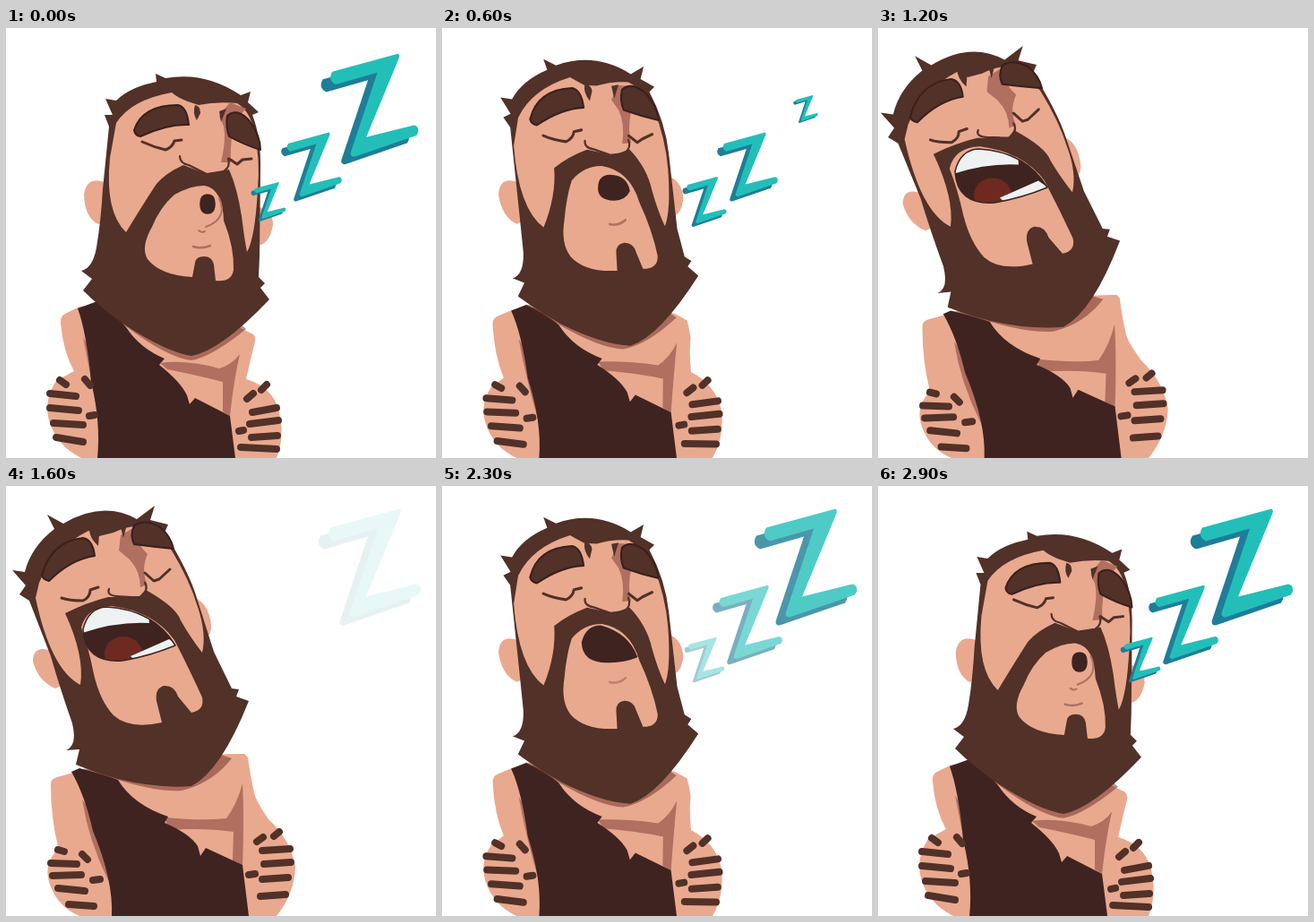
Recreate the animation shown at these times as an HTML page. Size 480 by 480 pixels, loop 3000 ms.

```html
<!DOCTYPE html>
<html lang="en">
<head>
<meta charset="utf-8">
<title>Snoring</title>
<style>
html, body { margin: 0; width: 100%; height: 100%; overflow: hidden; background: #fff; }
svg { display: block; width: 100%; height: 100%; }
</style>
</head>
<body>
<svg id="stage" viewBox="0 0 480 480" stroke-linejoin="round" stroke-linecap="round"></svg>
<script>
const stage = document.getElementById('stage');
const skin = '#e9a98f', shade = '#b06f5f', hair = '#513128', dark = '#3f2320';
const LOOP = 3000, STEP = 100;

function add(tag, attrs = {}, parent = stage) {
  const el = document.createElementNS('http://www.w3.org/2000/svg', tag);
  for (const k in attrs) el.setAttribute(k, attrs[k]);
  return parent.appendChild(el);
}

// Blend two paths that share the same commands.
function blend(a, b, k) {
  const to = b.match(/-?[\d.]+/g);
  let i = 0;
  return a.replace(/-?[\d.]+/g, v => (+v + (to[i++] - v) * k).toFixed(2));
}

// Find the pair of keys around t and pass them to mix.
function keyed(keys, t, mix = (a, b, k) => a + (b - a) * k) {
  let i = 1;
  while (i < keys.length - 1 && keys[i][0] < t) i++;
  const [t0, a] = keys[i - 1], [t1, b] = keys[i];
  return mix(a, b, Math.max(0, Math.min(1, (t - t0) / (t1 - t0))));
}

// Each shape has an upright and a leaning form.
const body = add('g'), head = add('g');
const shapes = [];
let layer = body;
function shape(fill, upright, leaning, attrs = {}) {
  const el = add('path', { fill, ...attrs }, layer);
  shapes.push({ el, upright, leaning });
  return el;
}
const line = (color, width, upright, leaning) =>
  shape('none', upright, leaning, { stroke: color, 'stroke-width': width });

// Body
shape(skin,
  'M82 311 L66 319 Q60 322 61 330 Q64 362 76 383 L56 394 Q42 415 48 438 Q56 466 84 480 L302 480 Q312 455 304 425 Q296 400 268 392 Q274 366 278 350 Q279 345 276 342 L258 333 L200 300Z',
  'M75 320 L57 325 Q49 327 50 335 Q50 370 58 402 L54 410 Q42 425 49 445 Q58 470 82 480 L302 480 Q322 455 323 425 Q318 395 293 372 Q278 350 277 342 Q273 325 270 303 L266 299 L195 300Z');
shape(shade,
  'M172 374 Q200 370 238 380 Q252 376 261 364 Q254 395 250 433 L242 428 L242 395 Q215 388 180 381Z',
  'M178 370 Q220 374 246 371 Q258 355 264 332 Q266 370 264 424 L253 418 L254 386 Q220 381 180 384Z');
shape(shade, 'M86 345 Q95 390 104 440 L110 440 L100 370Z', 'M85 350 Q92 395 114 440 L118 440 L100 370Z');
shape(dark,
  'M80 313 L102 305 Q120 316 134 334 Q150 358 177 369 L171 376 Q195 395 202 410 L205 420 L211 413 L250 433 L256 480 L102 480 Q106 440 95 395 Q90 340 80 313Z',
  'M73 319 L82 315 Q110 322 125 328 Q142 356 181 369 L177 376 Q205 388 214 402 L217 413 L223 404 L264 423 L271 480 L118 480 Q120 440 97 385 Q88 345 73 319Z');
line(hair, 8,
  'M60 393 L67 398 M49 408 L78 411 M49 424 L81 427 M53 441 L86 443 M56 457 L86 462 M88 392 L94 399 M93 433 L99 432',
  'M58 406 L65 408 M50 421 L79 422 M52 435 L84 434 M58 449 L88 452 M70 467 L98 469 M85 411 L91 417 M97 440 L105 439');
line(hair, 8,
  'M285 404 L291 398 M269 414 L276 408 M275 429 L302 424 M272 442 L304 438 M260 450 L265 449 M274 457 L303 455 M262 468 L302 470',
  'M299 391 L305 386 M280 397 L287 392 M286 407 L317 405 M288 422 L318 420 M271 434 L278 433 M286 439 L315 437 M284 458 L312 456');

// Beard shadow
shape('#6b2a24',
  'M98 304 L134 333 Q180 368 207 371 Q230 367 268 336 L250 320Z',
  'M85 316 L125 328 Q170 342 196 340 Q230 332 252 304 L240 300Z', { opacity: .5 });

// Ears
layer = head;
shape(skin, 'M110 172 Q90 165 87 186 Q88 212 103 219 L112 215Z',
  'M48 183 Q30 178 30 196 Q36 218 55 226 L64 222Z');
shape(skin, 'M280 200 Q298 202 298 220 Q294 242 280 243Z',
  'M210 125 Q226 130 229 155 Q230 168 218 173Z');

// Hair and beard
shape(hair,
  'M115 110 L110 97 L119 97 L111 79 L123 81 Q138 66 168 60 L167 51 L178 56 Q222 48 262 75 L273 71 L270 83 L282 94 L275 97 Q285 122 284 160 L283 255 L282 278 L289 285 L284 290 L294 303 Q240 360 207 366 Q180 362 135 333 Q105 312 86 293 L96 280 L84 271 Q97 268 101 245 Q106 215 108 180Z',
  'M26 128 L15 121 L22 111 L7 94 L21 96 Q28 68 54 48 L46 32 L64 42 Q108 16 146 37 L166 22 L161 38 L181 43 L177 52 Q204 95 213 125 L232 185 L252 226 L260 227 L257 235 L271 240 Q240 318 207 335 Q170 338 125 327 Q100 320 78 311 L82 294 L67 295 Q80 290 74 265 Q60 225 50 190Z');

// Face
shape(skin,
  'M123 106 Q140 80 185 72 Q192 78 203 82 L215 86 Q235 82 258 84 Q272 92 277 115 Q284 145 281 180 Q278 235 269 250 Q266 235 263 210 Q258 178 249 158 L224 163 L198 153 Q178 162 168 174 Q156 192 134 228 Q110 205 116 145Z',
  'M37 108 Q52 70 92 50 Q100 52 104 56 L120 52 Q135 45 145 45 Q178 62 185 72 Q205 105 214 135 Q224 165 219 186 Q205 168 195 150 Q190 135 156 116 L148 124 L114 124 Q90 130 66 142 Q88 190 83 222 Q50 205 33 125Z');
shape(skin,
  'M188 186 Q208 175 222 176 Q242 180 243 215 Q255 245 254 270 Q252 284 234 282 L232 264 Q230 255 221 255 Q212 255 211 262 L208 278 Q172 276 158 258 Q150 245 163 222 Q172 200 188 186Z',
  'M84 158 Q90 135 118 134 Q165 140 188 172 Q205 205 219 236 Q222 250 207 253 L192 235 Q188 222 176 223 Q166 226 168 240 L174 264 Q138 272 120 256 Q105 240 98 210 Q92 180 84 158Z');
shape(shade,
  'M250 83 L268 90 Q258 100 253 115 Q250 135 251 150 L240 150 Q246 125 243 110 L238 98Z',
  'M128 55 L142 47 Q146 65 158 76 Q150 95 158 110 L150 113 Q150 95 138 82 L126 72Z');
line(hair, 2.2, 'M194 143 Q194 151 204 153 L224 163 L243 160 Q251 155 248 146',
  'M115 115 Q112 122 124 123 L140 124 L150 124 Q160 116 155 108');
line(hair, 3, 'M152 127 Q165 133 178 136 Q186 133 188 126 L196 125',
  'M62 125 Q70 128 86 128 Q94 124 94 116 L103 113');
line(hair, 3, 'M249 146 L258 152 L264 147 L274 146', 'M155 97 L165 106 L171 104 L183 93');

// Frown and brows
const edge = { stroke: '#3a1f1c', 'stroke-width': 2 };
shape(hair, 'M211 86 Q217 87 217 95 L213 103 Q208 95 211 86Z', 'M93 48 Q103 46 104 54 L103 67 Q93 58 93 48Z');
shape(hair, 'M238 93 L246 90 L240 105Z', 'M127 42 L135 43 L131 58Z');
shape(hair, 'M143 114 Q152 86 192 86 Q202 88 204 108 Q180 107 150 121 Q144 120 143 114Z',
  'M40 100 Q50 62 86 58 Q97 60 99 78 Q72 82 48 106 Q41 104 40 100Z', edge);
shape(hair, 'M247 98 Q258 88 272 104 Q284 120 284 136 Q265 130 249 121 Q245 110 247 98Z',
  'M143 44 Q155 36 172 46 Q184 56 187 70 Q165 68 143 65 Q138 55 143 44Z', edge);

// Creases around the mouth
const crease = line(shade, 2.5, 'M209 244 Q218 247 228 243', 'M155 189 Q166 190 171 179');
const pout = line(shade, 2, 'M238 190 Q248 213 223 222 M215 226 Q218 229 222 227',
  'M150 160 Q160 175 145 185 M140 180 Q142 182 145 181');

// Mouth
const wide = 'M86 160 Q92 136 112 135 Q165 138 189 178 Q160 190 130 195 Q88 198 86 160Z';
const small = 'M217 196 Q217 186 225 186 Q233 186 233 196 Q233 207 225 207 Q217 207 217 196Z';
const mouthKeys = [
  [0, small],
  [400, 'M203 188 Q203 178 213 177 Q224 178 224 188 Q224 200 213 200 Q203 200 203 188Z'],
  [800, 'M147 165 Q148 152 162 152 Q188 152 194 176 Q185 183 172 184 Q143 183 147 165Z'],
  [1200, wide],
  [1600, wide],
  [2000, 'M105 160 Q112 136 132 137 Q178 145 200 180 Q172 188 146 191 Q106 194 105 160Z'],
  [2500, 'M191 184 Q194 170 207 169 Q228 178 229 198 Q222 203 210 200 Q191 198 191 184Z'],
  [2800, small],
  [LOOP, small]
];
const mouth = add('path', { fill: dark });
const lips = add('path', {}, add('clipPath', { id: 'lips' }));
const inside = add('g', { 'clip-path': 'url(#lips)' });
const upper = add('path', { fill: '#eff2f2', d: 'M80 166 L86 130 L158 130 L160 153 Q120 151 80 166Z' }, inside);
const lower = add('g', {}, inside);
add('ellipse', { cx: 131, cy: 187, rx: 21, ry: 19, fill: '#6e2a20' }, lower);
add('path', { fill: '#eff2f2', d: 'M139 190 L182 171 L195 180 L150 200Z' }, lower);
const rim = add('path', { fill: 'none', stroke: dark, 'stroke-width': 1.5 });

// Letters, from far to near: pulse and shrink, then fade back in
const zPath = 'M-44 -44 L33 -65 Q36 -64 34 -59 L-4 33 L52 19 Q58 20 57 27 L55 31 L-18 56 Q-24 56 -22 50 L9 -43 L-40 -29 Q-50 -34 -44 -44Z';
const letters = [
  { x: 406, y: 90.5, size: 1, fadeStart: 1500,
    pulse: [[0, .95], [100, 1.12], [200, 1.28], [300, 1.2], [400, 1], [600, .24], [700, 0]] },
  { x: 341, y: 155, size: .68, fadeStart: 1700,
    pulse: [[0, .87], [100, .9], [200, 1.03], [400, 1.19], [500, 1.12], [600, .87], [800, .11], [900, 0]] },
  { x: 293, y: 194, size: .39, fadeStart: 1900,
    pulse: [[0, .87], [200, .9], [400, 1.06], [500, 1.18], [600, 1.1], [800, .57], [900, .25], [1000, 0]] }
].map(z => {
  const el = add('g');
  add('path', { d: zPath, fill: '#1f7d98', transform: 'translate(-11 9)' }, el);
  add('path', { d: zPath, fill: '#22bfb8' }, el);
  return { ...z, el };
});

const leanKeys = [[0, 0], [100, 0], [200, .03], [300, .08], [400, .15], [600, .4], [800, .67], [1000, .9],
  [1200, 1.04], [1400, 1.04], [1600, 1], [1800, .94], [2000, .78], [2200, .54], [2400, .26],
  [2500, .14], [2600, .07], [2800, .01], [LOOP, 0]];
const openKeys = [[700, 0], [800, .15], [1100, 1], [2000, 1], [2300, .3], [2500, 0]];

function draw(t) {
  const lean = keyed(leanKeys, t), open = keyed(openKeys, t);
  for (const s of shapes) s.el.setAttribute('d', blend(s.upright, s.leaning, lean));
  pout.setAttribute('opacity', Math.max(0, 1 - lean * 4));
  crease.setAttribute('opacity', 1 - open);

  // The head swings on an arc: it stretches and shears a little on the way.
  const arc = Math.max(0, 4 * lean * (1 - lean)), stretch = .033 * arc, shear = .03 * arc;
  head.setAttribute('transform', `matrix(1 0 ${shear} ${1 + stretch} ${-230 * shear} ${-320 * stretch})`);

  const d = keyed(mouthKeys, t, blend);
  for (const el of [mouth, lips, rim]) el.setAttribute('d', d);
  const dx = (1 - lean) * 75, dy = (1 - lean) * 12;
  upper.setAttribute('transform', `translate(${dx} ${dy - (1 - open) * 6})`);
  lower.setAttribute('transform', `translate(${dx} ${dy + (1 - open) * 30})`);

  for (const z of letters) {
    const returning = t >= 1200;
    const scale = z.size * (returning ? 1 : keyed(z.pulse, t));
    z.el.setAttribute('transform', `translate(${z.x} ${z.y}) scale(${scale})`);
    z.el.setAttribute('opacity', returning ? keyed([[z.fadeStart, 0], [z.fadeStart + 1000, 1]], t) : 1);
  }
}

function tick() {
  draw(Math.floor(performance.now() % LOOP / STEP) * STEP);
  requestAnimationFrame(tick);
}
tick();
</script>
</body>
</html>
```
